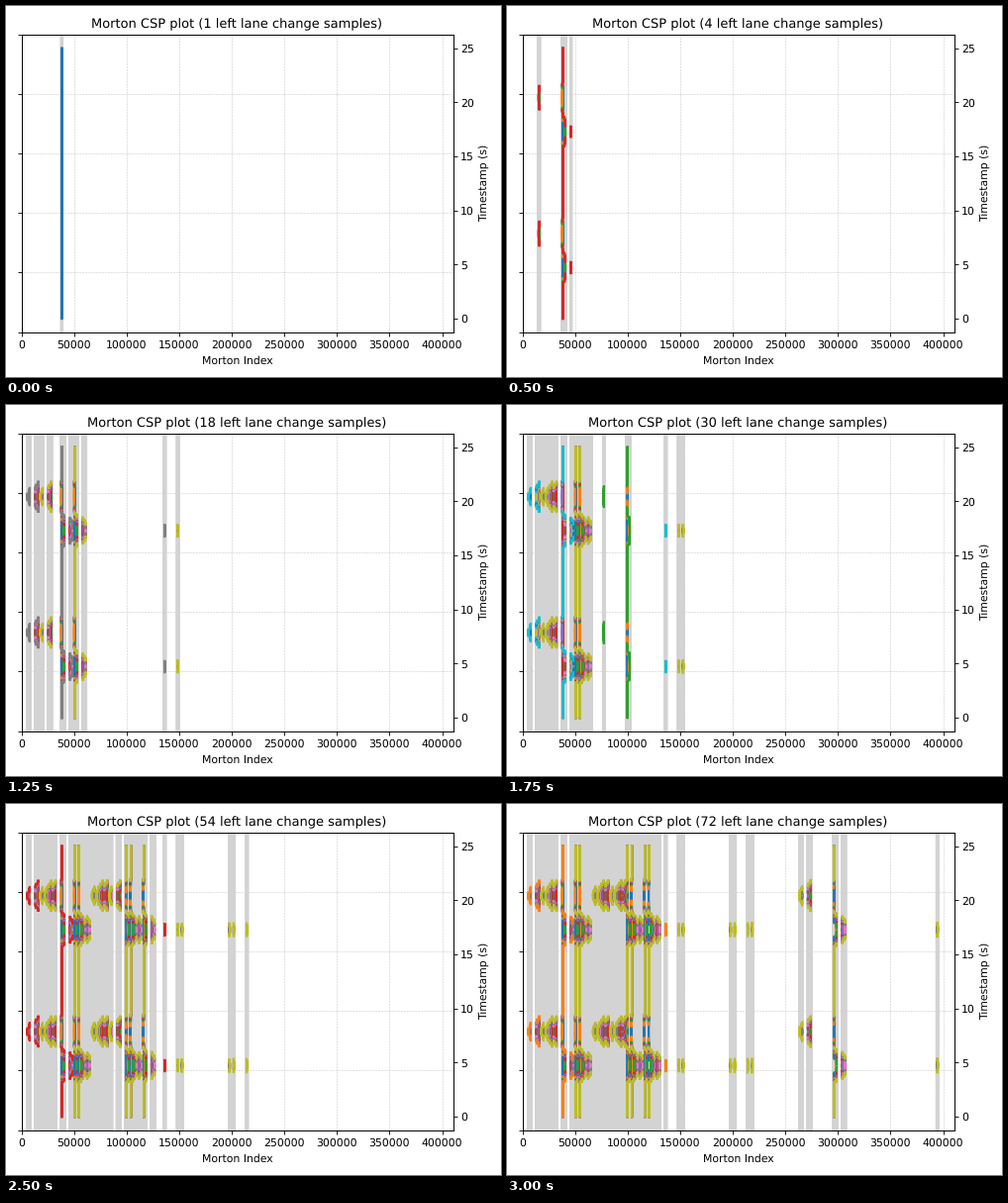
Animation of 500x375 px, one loop 3500 ms. Source, as a matplotlib script:

```python
import numpy as np
import matplotlib.pyplot as plt
from matplotlib.animation import FuncAnimation

W, H = 500, 375
COUNTS = [1, 2, 4, 8, 12, 18, 24, 30, 36, 45, 54, 63, 72, 72]
GROUP = 9        # amplitudes per longitudinal level
CENTER = 149.5   # lateral value while driving straight
T = np.linspace(0, 25, 501)
DT = T[1] - T[0]

plt.rcParams["text.hinting"] = "none"


def spread(v):
    """Insert a zero bit between all bits of v."""
    return sum(((v >> i) & 1) << (2 * i) for i in range(10))


def sample_index(s):
    """Morton index over time for sample s."""
    level, step = s // GROUP + 1, s % GROUP
    amp = 15 * step + 2.5 + 1.3 * level
    phase = T % (4 * np.pi)
    active = (phase > np.pi) & (phase < 3 * np.pi)
    lateral = np.floor(CENTER - amp * np.sin(T) * active).astype(int)
    return 2 * spread(lateral) + spread(64 * level + 47)


def dashes(x):
    """One short vertical stroke per time step, separated by gaps."""
    gap = np.full(len(T), np.nan)
    xs = np.column_stack([x, x, gap]).ravel()
    ts = np.column_stack([T - DT / 2, T + DT / 2, gap]).ravel()
    return xs, ts


def color_of(s, n):
    if s == GROUP - 1:
        return f"C{(n - 1) % 10}"
    shift = n % GROUP if s < GROUP < n else 0
    return f"C{(s % GROUP + shift) % 10}"


fig, ax = plt.subplots(figsize=(6.4, 4.8), dpi=W / 6.4)
fig.subplots_adjust(left=15.5 / W, right=451.5 / W,
                    bottom=1 - 329.5 / H, top=1 - 29 / H)
ax.set_axisbelow(True)
ax.grid(color="#b0b0b0", ls="--", lw=0.5, alpha=0.7)
ax.set_xlim(0, 410350)
ax.set_ylim(0, 1)
ax.set_yticks(np.linspace(0, 1, 6), [""] * 6)
ax.tick_params(axis="x", pad=4)
ax.set_xlabel("Morton Index", labelpad=5)
title = ax.set_title("")

time_ax = ax.twinx()
time_ax.set_ylim(-1.25, 26.25)
time_ax.set_ylabel("Timestamp (s)")

indices = [sample_index(s) for s in range(COUNTS[-1])]
bands = ax.vlines([], 0, 1, color="lightgray", lw=2.8, zorder=1)
bands.set_snap(False)
lines = [time_ax.plot(*dashes(x), lw=1.9, solid_capstyle="projecting",
                      snap=False, zorder=2 + s / 100)[0]
         for s, x in enumerate(indices)]


def update(frame):
    n = COUNTS[frame]
    title.set_text(f"Morton CSP plot ({n} left lane change samples)")
    used = np.unique(np.concatenate(indices[:n]))
    bands.set_segments([[(x, 0), (x, 1)] for x in used])
    for s, line in enumerate(lines):
        line.set_visible(s < n)
        line.set_color(color_of(s, n))
    return [title, bands, *lines]


anim = FuncAnimation(fig, update, frames=len(COUNTS), interval=250,
                     init_func=lambda: update(0), repeat=True, repeat_delay=0)
plt.show()
```
